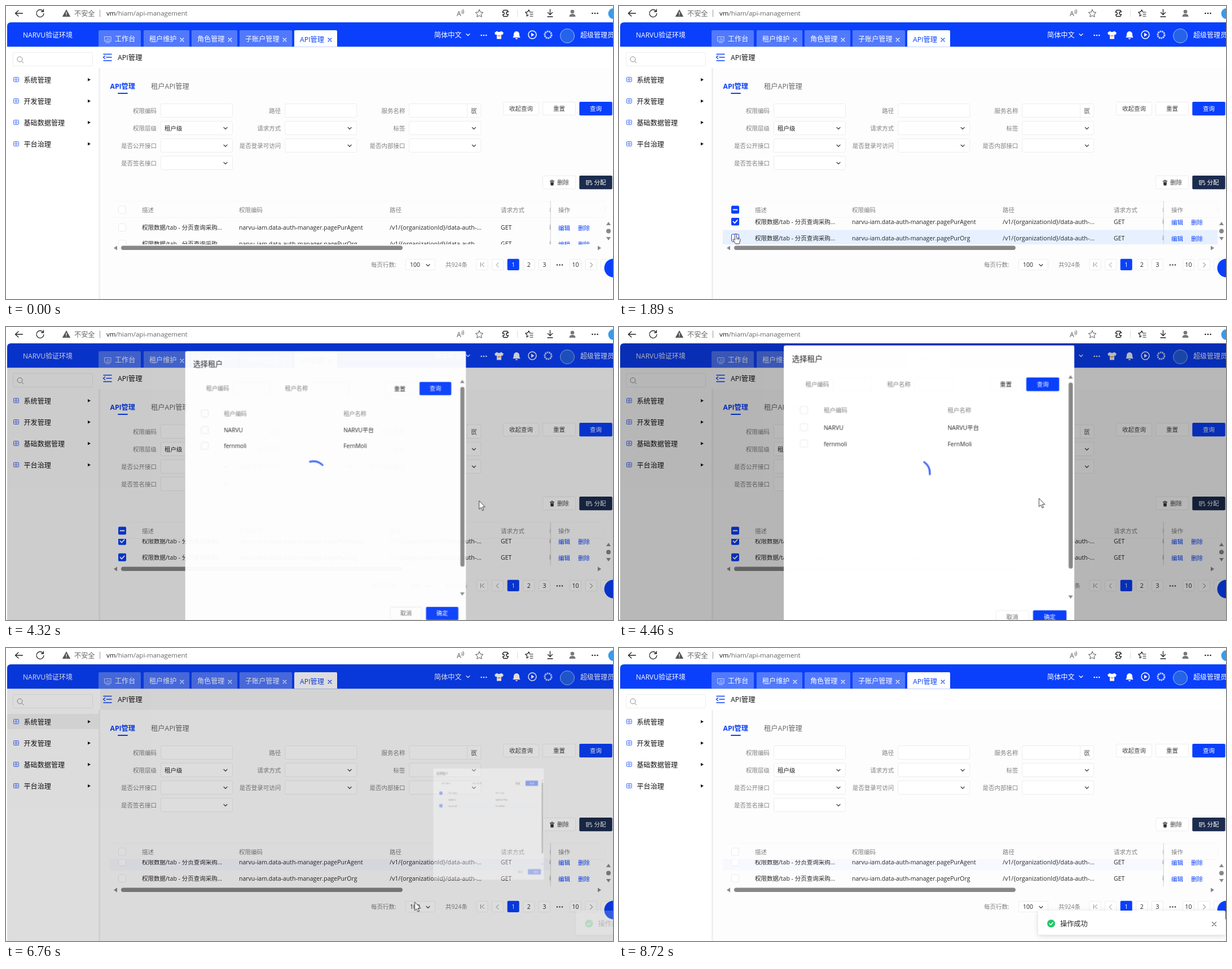
Animation, 1076 px wide and 520 px high, one loop 9.4 s. Source, as an HTML page:

```html
<!DOCTYPE html>
<html lang="zh-CN">
<head>
<meta charset="utf-8">
<title>API管理</title>
<style>
html, body { margin: 0; width: 100%; height: 100%; overflow: hidden; background: #fff; }
svg { display: block; font-family: "Open Sans", "Noto Sans CJK SC", "Noto Sans CJK", sans-serif; }
.line { fill: none; stroke-linecap: round; stroke-linejoin: round; }
#modal { transform-origin: 1043px 325px; }
#spin { transform-origin: 526px 259px; }
</style>
</head>
<body>
<svg id="stage" width="1076" height="520" viewBox="0 0 1076 520"></svg>
<script>
const LOOP = 9400;
const BLUE = '#0a40fc', INK = '#262626', GREY = '#808080', EDGE = '#ededed', BAR = '#888';

// Drawing helpers; text y is the middle of the line.
const text = (x, y, s, { size = 10.5, fill = INK, anchor = 'start', weight = 400 } = {}) =>
  `<text x="${x}" y="${y + size * .37}" font-size="${size}" fill="${fill}" text-anchor="${anchor}" font-weight="${weight}">${s}</text>`;
const box = (x, y, w, h, fill = 'none', stroke = 'none', r = 2) =>
  `<rect x="${x}" y="${y}" width="${w}" height="${h}" rx="${r}" fill="${fill}" stroke="${stroke}"/>`;
const line = (d, stroke = INK, width = 1) =>
  `<path class="line" d="${d}" stroke="${stroke}" stroke-width="${width}"/>`;
const shape = (d, fill) => `<path d="${d}" fill="${fill}"/>`;
const dot = (x, y, r, fill, stroke = 'none', width = 1) =>
  `<circle cx="${x}" cy="${y}" r="${r}" fill="${fill}" stroke="${stroke}" stroke-width="${width}"/>`;
const dots = (x, y, gap, fill) => [-gap, 0, gap].map(d => dot(x + d, y, 1.3, fill)).join('');
const group = (id, body, more = '') => `<g id="${id}" ${more}>${body}</g>`;
const chevron = (x, y, c = '#444') => line(`M${x - 3} ${y - 1.5}l3 3 3-3`, c, 1.2);
const cross = (x, y, c, r = 3) => line(`M${x - r} ${y - r}l${2 * r} ${2 * r}m0 ${-2 * r}l${-2 * r} ${2 * r}`, c, 1.1);
const button = (x, y, w, s, fill = '#fff', color = '#444', dx = 0) =>
  (fill === '#fff' ? box(x + .5, y + .5, w - 1, 23, fill, EDGE) : box(x + .3, y, w - .6, 24.2, fill)) +
  text(x + w / 2 + dx, y + 12, s, { fill: color, anchor: 'middle' });
const check = (x, y, id, minus) =>
  box(x - 6.5, y - 6.5, 13, 13, '#fff', '#ebebeb') +
  (id ? group(id, box(x - 7, y - 7, 14, 14, BLUE) +
    line(minus ? `M${x - 3.5} ${y}h7` : `M${x - 3.5} ${y}l2.6 2.8 4.6-5.2`, '#fff', 1.8)) : '');

function browserBar() {
  const c = '#222';
  return line('M29.500 13H17m5-5l-5.500 5 5.500 5', c, 1.3) +
    line('M66 9.500a6.500 6.500 0 1 0 1 4M66.500 6v4h-4', c, 1.3) +
    shape('M107 6l7.200 13H99.800z', '#555') + line('M107 11v3.500m0 2v.2', '#fff', 1.3) +
    text(121, 13, '不安全', { size: 12.2, fill: '#666' }) + line('M166.500 7v12', '#999') +
    text(178, 13, 'vm<tspan fill="#666">/hiam/api-management</tspan>', { size: 11.5, fill: '#111' }) +
    text(799, 14, 'A', { size: 12, fill: '#555' }) + line('M808 8q2 2 0 5m2-7q3 4 0 8', '#555') +
    line('M839 6.500l2 4.300 4.800.6-3.500 3.200.9 4.700-4.200-2.300-4.200 2.300.9-4.700-3.500-3.200 4.800-.6z', '#555') +
    line('M882 7.500h6.500l2 3h-1.500a2 2 0 0 0 0 4.500h1.500l-2 3.500H882l-1.500-3h1a2.300 2.300 0 0 0 0-4.500h-1.500z', c, 1.4) +
    line('M906.500 7v12', '#ddd') +
    line('M926 16l-3 2 .7-4-3-3 4-.6 2-3.600 1.800 3.600M929 11h5m-5 3.500h5m-5 3.500h5', c, 1.2) +
    line('M964.500 6v9.500m-4-4l4 4 4-4M960 19h9', c, 1.3) +
    dot(1004, 10, 3.3, '#777') + shape('M998.500 19q0-5 5.500-5t5.500 5z', '#777') +
    dots(1044, 13, 4.5, c) + dot(1077, 13.5, 9.5, '#3b9be8');
}

function header() {
  const tabs = [[164, 75, '工作台'], [244, 81, '租户维护'], [329, 81, '角色管理'], [414, 93, '子账户管理'], [511, 76, 'API管理']];
  const tab = ([x, w, s], i) => {
    const on = i === 4, c = on ? BLUE : '#fff';
    return box(x, 43, w, 31, on ? '#fff' : '#5179fc') +
      text(x + (i ? 10 : 29), 59, s, { size: on ? 12.25 : 12.1, fill: c }) +
      (i ? cross(x + w - 13, 60, c) : line('M175 54.500h11v8h-11zm2 10.500h7m-6-5v-1m2.500 1v-3m2.500 3v-2', '#c9d5ff'));
  };
  return shape('M2 72.300V36q0-7 7-7h1067v43.300z', BLUE) +
    text(30, 51.5, 'NARVU验证环境', { size: 12, fill: '#fff', weight: 500 }) +
    `<g clip-path="url(#top)">${tabs.map(tab).join('')}</g>` +
    text(759, 51.5, '简体中文', { size: 12.2, fill: '#fff' }) + chevron(819, 51, '#fff') + dots(847, 52, 4.3, '#fff') +
    shape('M870 44.500q4 3 8 0l4 3-2 4-2-1v8h-8v-8l-2 1-2-4z', '#fff') + line('M872 53h4', '#f0a040', 2) +
    shape('M898 56q2-1 2-6a5 5 0 0 1 10 0q0 5 2 6zM903 57h4a2 2 0 0 1-4 0z', '#fff') +
    dot(933, 51, 7, 'none', '#fff', 1.5) + shape('M931 47.500l5.500 3.500-5.500 3.500z', '#fff') +
    `<circle cx="961" cy="51" r="6" fill="none" stroke="#c8d6ff" stroke-width="3" stroke-dasharray="2.6 1"/>` +
    dot(995, 53, 12.5, '#2563e8', '#9db8fa') +
    text(1018, 51.5, '超级管理员', { size: 12, fill: '#fff' });
}

function sidebar() {
  const items = ['系统管理', '开发管理', '基础数据管理', '平台治理'];
  return group('sideHover', box(2, 117, 162, 27, '#000', 'none', 0) + box(167, 72, 909, 38, '#000', 'none', 0), 'opacity=".045"') +
    box(12.5, 82.5, 141, 24, 'none', EDGE) + dot(24.5, 94.5, 4.5, 'none', '#888') + line('M28 98l3 3', '#888') +
    items.map((s, i) => {
      const y = 131 + i * 38;
      return box(13.5, y - 4.5, 9, 8, '#e6ecff', '#4a70fa', 1) + dot(18, y - .5, 1.7, 'none', '#4a70fa') +
        text(31.5, y + .5, s, { size: 12.1, fill: '#111' }) + shape(`M145 ${y - 3}l5 2.800-5 2.800z`, '#111');
    }).join('') + box(164, 110, 3, 410, '#f0f0f0', 'none', 0);
}

function form() {
  const fields = [
    ['权限编码', '路径', '服务名称'], ['权限层级', '请求方式', '标签'],
    ['是否公开接口', '是否登录可访问', '是否内部接口'], ['是否签名接口']
  ];
  const field = (s, r, c) => {
    const x = 274 + c * 220.2, y = 185.5 + r * 31;
    return text(x - 7, y + .5, s, { fill: GREY, anchor: 'end' }) + box(x + .5, y - 12, 127, 24, '#fff', EDGE) +
      (r ? chevron(x + 115, y + .5) : '');
  };
  return line('M173 85.500h14m-9 5.500h9m-14 6h14M175.500 88.500l-3 2.500 3 2.500', BLUE, 1.5) +
    text(198, 91, 'API管理', { size: 12.4, fill: '#111' }) +
    text(184.5, 142, 'API管理', { size: 12.2, fill: BLUE, weight: 700 }) + box(198, 154, 18, 2, BLUE, 'none', 1) +
    text(257, 142, '租户API管理', { size: 12.3, fill: '#666' }) +
    fields.map((row, r) => row.map((s, c) => field(s, r, c)).join('')).join('') +
    text(281, 217, '租户级', { fill: '#222' }) +
    line('M817.500 174v23', EDGE) + line('M825 182h9m-8 2.500v6h2.500m-2.500-6h7m1 7l-1.500-1.500', '#555') + dot(830.5, 188, 2, 'none', '#555') +
    button(881, 170, 64, '收起查询') + button(951, 170, 59, '重置') + button(1016, 170, 59, '查询', BLUE, '#fff') +
    button(951, 301, 59, '删除', '#fff', '#444', 7) + button(1016, 301, 59, '分配', '#1c2c4e', '#fff', 7.5) +
    shape('M964 310h8v1.500h-8zm2.500-1.500h3v1h-3zM965 312.500h6l-.5 6h-5z', '#333') +
    line('M1029 310h8v4m-8-4v7h4m-2-4.500h4m-4 2h2m3 2l2 1 1-3', '#fff');
}

function tableRow(n, code) {
  const y = 393.5 + 29 * (n - 1);
  return group('hover' + n, box(184, y - 14.5, 877, 29, '#e6f0ff', 'none', 0)) +
    (n === 1 ? group('stale', box(184, y - 14.5, 782, 29, '#f7f9ff', 'none', 0)) : '') +
    check(206, y - .5, 'check' + n) +
    (n === 2 ? group('focus', box(199.5, y - 7, 13, 13, 'none', BLUE)) : '') +
    text(241, y, '权限数据/tab - 分页查询采购...') + text(413, y, `narvu-iam.data-auth-manager.${code}`) +
    text(680, y, '/v1/{organizationId}/data-auth-...', { size: 10.65 }) + text(877, y, 'GET') + clipped(y, '租', INK) +
    text(979, y + 1, '编辑', { fill: BLUE }) + text(1014, y + 1, '删除', { fill: BLUE });
}
const clipped = (y, s, fill) => `<svg x="0" width="966" height="520">${text(963, y, s, { fill })}</svg>`;

function table() {
  const head = [[241, '描述'], [413, '权限编码'], [680, '路径'], [877, '请求方式'], [979, '操作']];
  const cells = [['|', 0], ['<', 0], ['1', 1], ['2', 0], ['3', 0], ['', 2], ['10', 0], ['>', 0]];
  const cell = ([s, kind], i) => {
    const x = 844 + i * 27.6;
    if (kind === 2) return dots(x - .5, 459.5, 4.5, '#444');
    return (kind ? box(x - 10.5, 448.8, 21, 20.2, BLUE) : box(x - 10, 449.5, 20, 19, '#fff', EDGE)) +
      (s === '|' ? line(`M${x - 2.500} 455.500v7m6 0l-4-3.500 4-3.500`, '#888') :
       s === '<' ? line(`M${x + 1.500} 455.500l-4 4 4 4`, '#888') :
       s === '>' ? line(`M${x - 1.500} 455.500l4 4-4 4`, '#666') :
       text(x, 459.5, s, { fill: kind ? '#fff' : INK, anchor: 'middle' }));
  };
  return line('M184 346.500h877', '#f8f8f8') + check(206, 361.5, 'checkAll', true) +
    head.map(([x, s]) => text(x, 362, s, { fill: GREY })).join('') + clipped(362, '标', GREY) +
    line('M184 375.500h877M1061.500 356v10', '#f5f5f5') +
    `<g clip-path="url(#body)">${group('rows', tableRow(1, 'pagePurAgent') + tableRow(2, 'pagePurOrg'))}</g>` +
    box(963, 346, 3, 77, 'url(#shade)', 'none', 0) +
    shape('M1064 389l4-6 4 6zM1064 410l4 6 4-6zM197 425.500v8l-6-4zM1049 425.500v8l6-4z', BAR) + dot(1068, 399.5, 4, BAR) +
    box(204, 425.5, 499, 7.5, BAR, 'none', 3.7) + group('barHover', box(204, 425.5, 499, 7.5, '#606060', 'none', 3.7)) +
    text(647, 459.5, '每页行数:', { fill: GREY }) + box(708.5, 449.5, 52, 19, '#fff', EDGE) + text(716, 459.5, '100') + chevron(748, 460) +
    text(779, 459.5, '共924条', { fill: GREY }) + cells.map(cell).join('') +
    box(1054.5, 449.5, 20, 19, '#fff', EDGE) + dot(1077, 465, 16.5, BLUE);
}

function modal() {
  const row = (y, id, name, a, b) => check(326.5, y - .5, id, name) +
    text(361.5, y, a, { fill: name ? GREY : INK }) + text(581.5, y, b, { fill: name ? GREY : INK });
  return box(291, 32, 516, 520, '#fff', 'none', 3) + text(305, 56, '选择租户', { size: 13.6, fill: '#222' }) +
    text(329, 101, '租户编码', { fill: GREY }) + text(474, 101, '租户名称', { fill: GREY }) +
    group('inputs', box(377.5, 89.5, 69, 23, 'none', EDGE) + box(522.5, 89.5, 69, 23, 'none', EDGE) + box(656.5, 89.5, 58, 23, 'none', EDGE)) +
    text(685, 101.5, '重置', { anchor: 'middle' }) + button(721, 89, 59, '查询', BLUE, '#fff') +
    group('pick', box(305, 192, 475, 29, '#f9fbff', 'none', 0)) +
    row(147.5, 'pickAll', true, '租户编码', '租户名称') + row(178, '', false, 'NARVU', 'NARVU平台') + row(207, 'pick2', false, 'fernmoli', 'FernMoli') +
    box(796.5, 98, 7.5, 331, BAR, 'none', 3.7) + shape('M796 91l4-6 4 6zM796 476.500l4 6 4-6z', BAR) +
    button(667, 503, 59, '取消', '#fff', '#666') + button(733, 503, 60, '确定', BLUE, '#fff') +
    group('busy', button(733, 503, 60, '确定', '#5078f8', '#fff', 8) + dot(751, 509.5, 1, '#b8c8ff')) +
    group('spin', line('M540.100 239.600A24 24 0 0 1 549.900 261.100', '#4a72fb', 3.6));
}

const toast = () => box(743, 466, 332, 43, '#fff', 'none', 3) + dot(766, 489, 7, '#1fc968') +
  line('M763 489l2.300 2.500 4-4.500', '#fff', 1.4) + text(782, 489.5, '操作成功', { size: 12.2 }) + cross(1055, 490, '#666', 3.5);

const pointer = () =>
  group('arrow', `<path d="M0 0v15l3.400-3.200 2.300 5.400 2.400-1-2.300-5.300h4.700z" fill="#fff" stroke="#223" stroke-width=".9"/>`) +
  group('hand', `<path d="M-1.500 10V1.500a1.500 1.500 0 0 1 3 0V7l5 1.200q1.800.6 1.500 2.600l-1 4-.8 2.700h-6.500L-4 12q-2-2.500-.5-3 1-.4 3 2z" fill="#fff" stroke="#223" stroke-width=".9"/>` + line('M2 8v2m2.500-1.500v2', '#223', .8)) +
  group('denied', dot(0, 0, 5.5, '#fff', '#c8102e', 2) + line('M-3.500-3.500l7 7', '#c8102e', 2));

document.getElementById('stage').innerHTML = `
  <defs>
    <clipPath id="top"><rect x="0" y="29" width="1076" height="43"/></clipPath>
    <clipPath id="body"><rect x="184" y="376" width="877" height="47"/></clipPath>
    <linearGradient id="shade"><stop stop-color="#fff" stop-opacity="0"/><stop offset="1" stop-color="#d0d0d0"/></linearGradient>
    <filter id="soft" x="-10%" y="-40%" width="120%" height="190%"><feDropShadow dx="0" dy="2" stdDeviation="4" flood-opacity=".15"/></filter>
  </defs>` +
  box(0, 0, 1076, 520, '#fff', 'none', 0) + box(167, 110, 909, 410, '#fdfdfd', 'none', 0) +
  browserBar() + header() + sidebar() + form() + table() +
  group('mask', shape('M2 520V36q0-7 7-7h1067v491z', '#000')) +
  group('modal', modal()) + group('toast', toast(), 'filter="url(#soft)"') + group('cursor', pointer());

// Every part runs one looping keyframe track; stops are [ms, css, easing].
const sheet = document.head.appendChild(document.createElement('style'));
function track(id, stops, ease = 'linear') {
  const all = [[0, stops[0][1]], ...stops, [LOOP, stops[stops.length - 1][1]]];
  const frames = all.map(([ms, css, e = ease]) =>
    `${(ms / LOOP * 100).toFixed(3)}% { ${css}; animation-timing-function: ${e} }`).join(' ');
  sheet.textContent += `@keyframes ${id} { ${frames} } #${id} { animation: ${id} ${LOOP}ms infinite }\n`;
}
const show = (id, ...spans) => track(id, [[0, 'visibility: hidden'],
  ...spans.flatMap(([from, to]) => [[from, 'visibility: visible'], [to, 'visibility: hidden']])], 'step-end');
const at = (x, y) => `transform: translate(${x}px, ${y}px)`;

track('cursor', [
  [120, at(1010, 518)], [500, at(560, 452)], [800, at(222, 396)], [940, at(206, 388)], [1500, at(206, 388)],
  [1750, at(207, 404.5)], [2350, at(207, 404.5), 'ease-in-out'], [3320, at(1038, 334)], [3520, at(1042.5, 318)],
  [4020, at(1042.5, 318)], [4460, at(744.5, 304)], [5000, at(720, 300), 'ease-in-out'], [5500, at(326, 203)],
  [5650, at(326, 203)], [5930, at(718, 498)], [6210, at(764, 506)], [6620, at(764, 506)],
  [6850, at(699.5, 416)], [7100, at(775, 466)], [7520, at(786, 467)], [7700, at(786, 467), 'ease-in-out'],
  [8150, at(230, 351), 'ease-in'], [8650, at(1000, 518)], [8720, at(1002, 522)]
]);
show('arrow', [120, 870], [2450, 3370], [4120, 5470], [5690, 6140], [6640, 8720]);
show('hand', [870, 2450], [3370, 4120], [5470, 5690], [6140, 6420]);
show('denied', [6420, 6640]);

track('rows', [[1400, at(0, 0), 'ease-out'], [1750, at(0, -10.5)], [2030, at(0, -10.5), 'step-end'], [2031, at(0, -13.2)]]);
show('hover1', [1080, 1600]);
show('hover2', [1680, 1960]);
show('focus', [1750, 2030]);
show('checkAll', [1080, 6700]);
show('check1', [1080, 6700]);
show('check2', [2030, 6700]);
show('stale', [6700, LOOP]);
show('sideHover', [6420, 7040]);
show('barHover', [6800, 7000]);

const out = 'cubic-bezier(.08, .82, .17, 1)';
track('mask', [[4080, 'opacity: 0'], [4420, 'opacity: .28'], [6620, 'opacity: .28'], [6850, 'opacity: .045'], [7040, 'opacity: 0']]);
track('modal', [
  [4100, 'opacity: 0; transform: scale(0)', out], [4520, 'opacity: 1; transform: scale(1)'],
  [6600, 'opacity: 1; transform: scale(1)', 'ease-in'], [6815, 'opacity: 0; transform: scale(0)']
]);
track('inputs', [[4460, 'opacity: .2'], [4750, 'opacity: 1']]);
track('spin', [
  [4100, 'opacity: 1; transform: rotate(-130deg)'], [4600, 'opacity: 1; transform: rotate(50deg)'],
  [4800, 'opacity: 0; transform: rotate(122deg)']
]);
show('pick', [5500, 6850]);
show('pickAll', [5600, 6850]);
show('pick2', [5600, 6850]);
show('busy', [6420, 6850]);
track('toast', [
  [6720, 'opacity: 0; transform: translateX(340px)'], [6850, 'opacity: .6; transform: translateX(110px)', 'ease-out'],
  [7060, 'opacity: 1; transform: none']
]);
</script>
</body>
</html>
```
